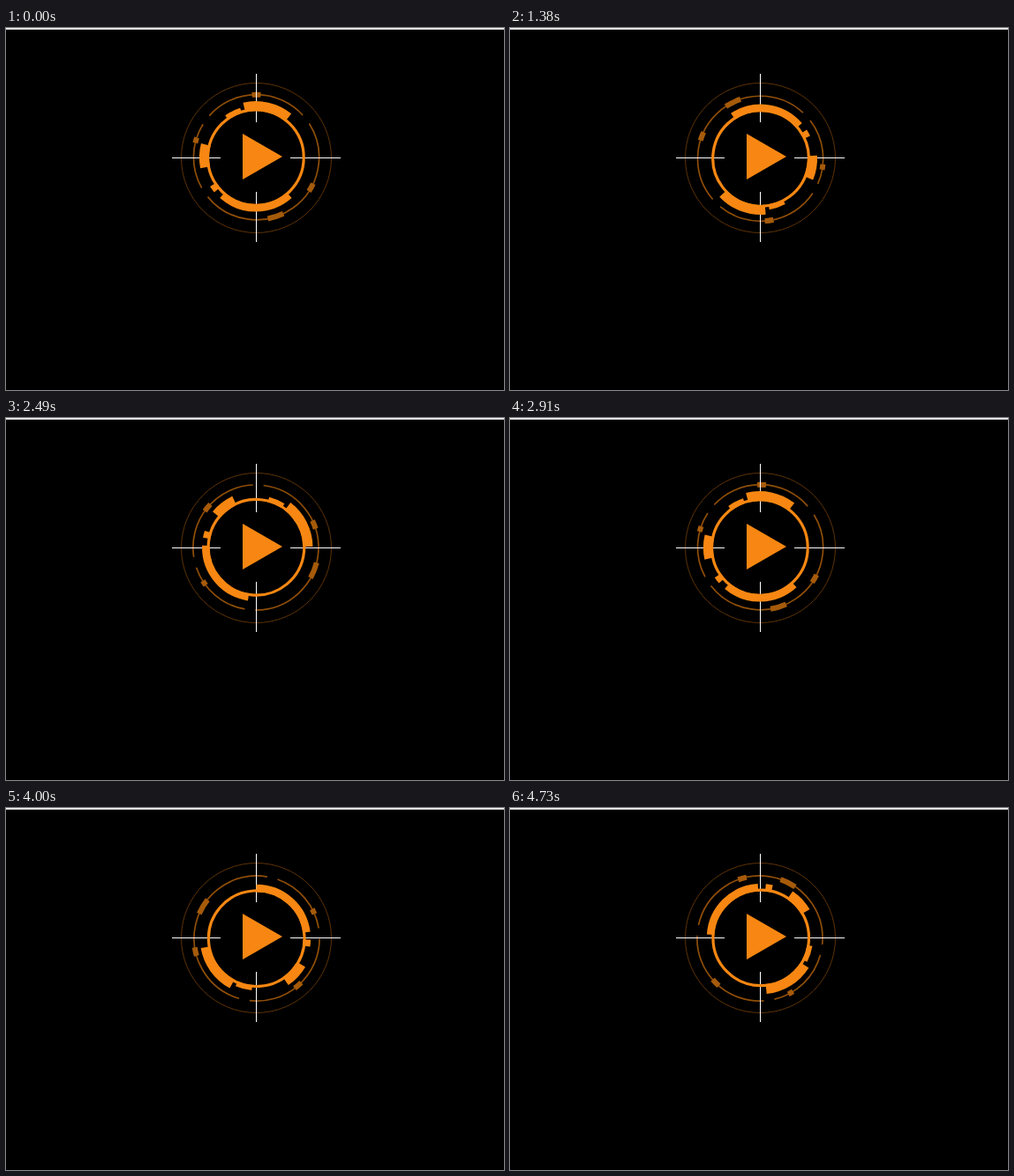
These frames come from a looping animation (564x411 px, 4.83 s). An HTML page:

```html
<!DOCTYPE html>
<html lang="en">
<head>
<meta charset="utf-8">
<title>Play button</title>
<style>
  html, body { margin: 0; width: 100%; height: 100%; overflow: hidden; background: #000; }
  svg { display: block; }
</style>
</head>
<body>
<svg width="564" height="411" viewBox="0 0 564 411" fill="none">
  <rect width="564" height="411" fill="#000"/>
  <rect width="564" height="1.8" fill="#f2f2f2"/>
  <g transform="translate(283.5 147.5)">
    <circle r="85" stroke="#5e3306"/>
    <g id="outer"></g>
    <path d="M0 -95.5V-40.5M0 38.5V95.5M-95.5 0H-40.5M38.5 0H95.5" stroke="#fff"/>
    <g id="inner"><circle r="54.3" stroke="#f78712" stroke-width="3.2"/></g>
  </g>
  <path d="M268 120L313 146L268 172Z" fill="#f78712"/>
</svg>
<script>
const LOOP = 4830;
const STEPS = 35;
const STEP_ANGLE = 17.2;
const ORANGE = '#f78712', DIM = '#8f4e08', BLOCK = '#a65b0a';
const outer = document.getElementById('outer');
const inner = document.getElementById('inner');

// Angles are in degrees, clockwise from the top.
function addArc(parent, from, sweep, r0, r1, color) {
  const r = (r0 + r1) / 2;
  const point = deg => {
    const a = deg * Math.PI / 180;
    return `${r * Math.sin(a)} ${-r * Math.cos(a)}`;
  };
  const path = document.createElementNS('http://www.w3.org/2000/svg', 'path');
  path.setAttribute('d', `M${point(from)}A${r} ${r} 0 ${sweep > 180 ? 1 : 0} 1 ${point(from + sweep)}`);
  path.setAttribute('stroke', color);
  path.setAttribute('stroke-width', r1 - r0);
  parent.append(path);
}

// Outer ring: three lines with equal gaps, and blocks of three sizes.
const lineStarts = [-48.5, 57.5, 240.5];
lineStarts.forEach((from, i) => {
  const next = lineStarts[i + 1] ?? lineStarts[0] + 360;
  addArc(outer, from, next - from - 9.7, 70.2, 71.9, DIM);
});
const addBlock = (mid, width) => addArc(outer, mid - width / 2, width, 68, 74, BLOCK);
addBlock(0, 8);
addBlock(119, 8);
addBlock(162, 15);
addBlock(285.7, 5);

// Inner ring: segments on a thin circle.
const addSegment = (from, sweep, r) => addArc(inner, from, sweep, 53, r, ORANGE);
addSegment(-13, 52, 64);
addSegment(138.5, 83, 61.4);
addSegment(230, 7.5, 61.4);
addSegment(259, 25.5, 64);
addSegment(324, 18.5, 59);

// Poses change on a 30 ms clock, about every 4.6 ticks.
const stepStart = i => 30 * Math.floor(4.6 * i + 0.4) - 20;

function stepAt(time) {
  let i = 0;
  while (i < STEPS - 1 && stepStart(i + 1) <= time) i++;
  return i;
}

// Both rings turn slightly off centre, which gives a small wobble.
function draw(time) {
  const angle = stepAt(time) * STEP_ANGLE;
  outer.setAttribute('transform', `rotate(${angle}) translate(0 -0.8)`);
  inner.setAttribute('transform', `rotate(${-angle}) translate(-0.6 -0.4)`);
}

const begin = performance.now();
function tick() {
  draw((performance.now() - begin) % LOOP);
  requestAnimationFrame(tick);
}
tick();
</script>
</body>
</html>
```
